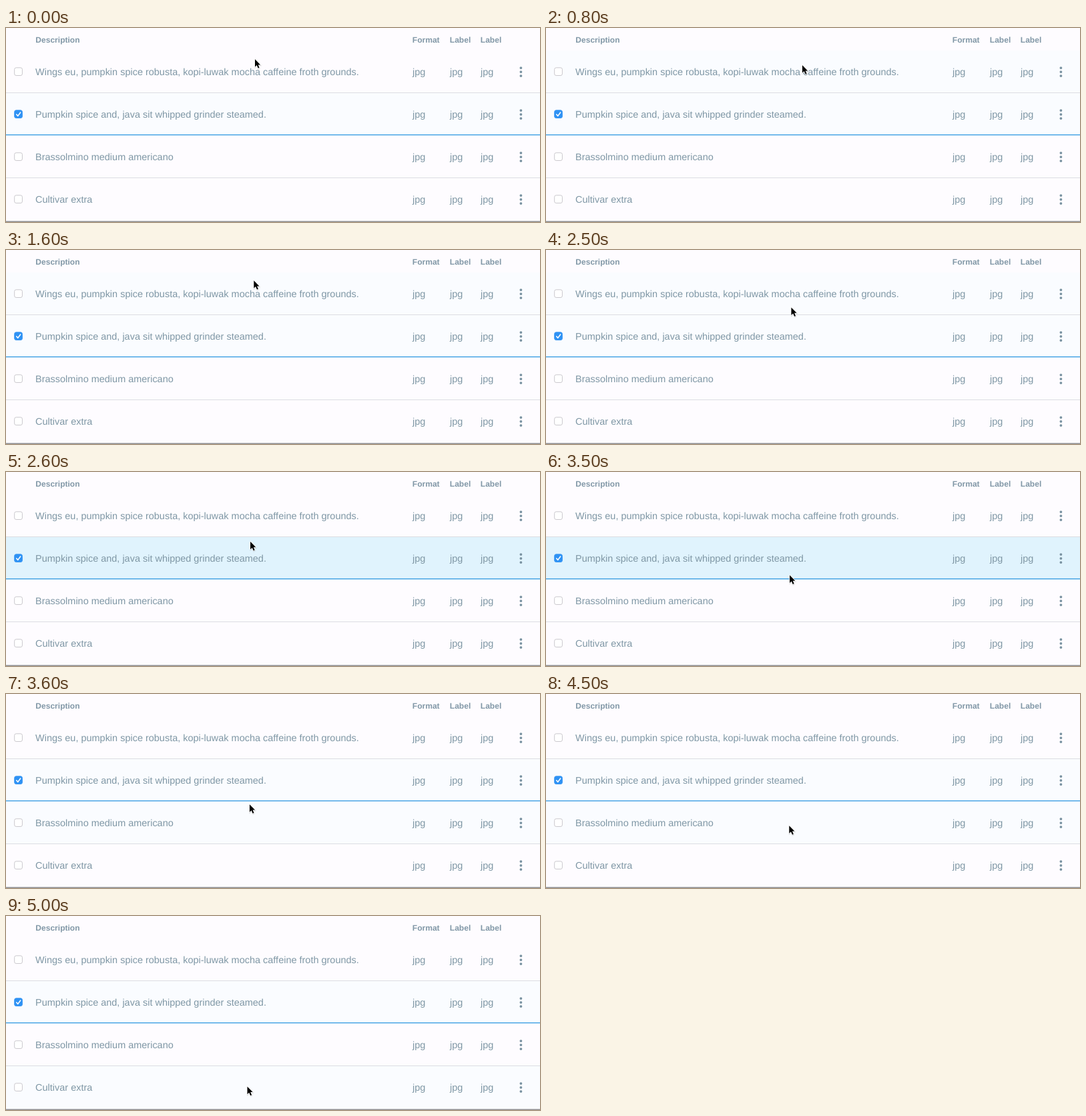
Animation of 800 by 292 pixels, one loop 5.1 s. Source, as an HTML page:

```html
<!DOCTYPE html>
<html lang="en">
<head>
<meta charset="utf-8">
<title>Table row hover</title>
<style>
  html, body { margin: 0; width: 100%; height: 100%; overflow: hidden; background: #fefcff; }
  svg { display: block; }
  text {
    font-family: "Liberation Sans", Arial, sans-serif;
    font-size: 14.47px;
    fill: #7f97a5;
    text-rendering: geometricPrecision;
  }
  .head { font-size: 12.05px; font-weight: bold; fill: #8298a7; }
  .dot { fill: #7891a0; }
  .box { fill: #fff; stroke: #cac8cd; }
  .box.on { fill: #2e92f4; stroke: #3b98f4; }
  .tick { fill: none; stroke: #fff; stroke-width: 1.6; stroke-linecap: round; stroke-linejoin: round; }
  .shade { fill: #000; stroke: #000; stroke-width: 1.5; opacity: .12; }
  .arrow { fill: #000; stroke: #fff; stroke-width: 1.5; stroke-linejoin: round; paint-order: stroke; }
</style>
</head>
<body>
<svg id="stage" width="800" height="292" viewBox="0 0 800 292"></svg>
<script>
const LOOP = 5100, STEP = 100;
const ROW_TOP = 34, ROW_H = 64;
const SELECTED = 1;
const PLAIN = "#fefcff", FAINT = "#fafcff", STRONG = "#e0f3fd";
const rows = [
  "Wings eu, pumpkin spice robusta, kopi-luwak mocha caffeine froth grounds.",
  "Pumpkin spice and, java sit whipped grinder steamed.",
  "Brassolmino medium americano",
  "Cultivar extra"
];
const columns = [[44.3, "Description"], [608.8, "Format"], [664.8, "Label"], [710.8, "Label"]];

// Pointer glides: each eases from the last point and rests until the next begins
const home = { x: 373, y: 47 };
const glides = [
  { from: 0, to: 500, x: 372, y: 74 },
  { from: 600, to: 800, x: 384, y: 56 },
  { from: 900, to: 1500, x: 382, y: 27 },
  { from: 1500, to: 1600, x: 371.3, y: 46 },
  { from: 1900, to: 2200, x: 371, y: 38.5 },
  { from: 2200, to: 2700, x: 365.5, y: 112.5 },
  { from: 2800, to: 3000, x: 365.5, y: 128 },
  { from: 3100, to: 4000, x: 364.5, y: 193.5 },
  { from: 4400, to: 5000, x: 361.5, y: 256.7 }
];

const stage = document.getElementById("stage");

function add(tag, attrs, content) {
  const el = document.createElementNS("http://www.w3.org/2000/svg", tag);
  for (const key in attrs) el.setAttribute(key, attrs[key]);
  if (content) el.textContent = content;
  stage.appendChild(el);
  return el;
}

const line = (y, height, fill) => add("rect", { x: 0, y, width: 800, height, fill });

const bands = rows.map((_, i) => line(ROW_TOP + i * ROW_H, ROW_H, PLAIN));

columns.forEach(([x, label]) => add("text", { x, y: 22.3, class: "head" }, label));

rows.forEach((label, i) => {
  const mid = 65.7 + i * ROW_H;
  const base = mid + 5.7;
  const on = i === SELECTED;
  add("rect", { x: 12.7, y: mid - 5.9, width: 11.7, height: 11.7, rx: 2.5, class: on ? "box on" : "box" });
  if (on) add("path", { d: `M15.7 ${mid + .3} l2.1 2.4 l3.8 -5.2`, class: "tick" });
  add("text", { x: 44.1, y: base }, label);
  columns.slice(1).forEach(([x]) => add("text", { x: x + .2, y: base }, "jpg"));
  [-6, 0, 6].forEach(dy => add("circle", { cx: 771.4, cy: mid + .4 + dy, r: 1.9, class: "dot" }));
});

line(97, 1, "#dcdde2");
line(160, 1.6, "#55abe6");
line(225, 1, "#dcdde2");
line(290, 1, "#c9cacd");
line(291, 1, "#8f8f92");

const d = "M0 0 V11.6 L2.7 9.1 L4.7 13.6 L6.6 12.8 L4.7 8.4 H8.2 Z";
const shade = add("path", { d, class: "shade" });
const arrow = add("path", { d, class: "arrow" });

const ease = u => u * u * (3 - 2 * u);

function tipAt(t) {
  let { x, y } = home;
  for (const g of glides) {
    if (t <= g.from) break;
    const k = ease(Math.min(1, (t - g.from) / (g.to - g.from)));
    x += (g.x - x) * k;
    y += (g.y - y) * k;
  }
  return { x, y };
}

function bandColor(i, over) {
  if (i === SELECTED) return over ? STRONG : FAINT;
  return over ? FAINT : PLAIN;
}

function draw(now) {
  const t = Math.floor(now % LOOP / STEP) * STEP;
  const { x, y } = tipAt(t);
  // Hover only registers once the pointer has moved
  const hovered = t > 0 ? Math.floor((y - ROW_TOP) / ROW_H) : -1;
  bands.forEach((band, i) => band.setAttribute("fill", bandColor(i, i === hovered)));
  arrow.setAttribute("transform", `translate(${x} ${y})`);
  shade.setAttribute("transform", `translate(${x + .3} ${y + 1})`);
}

const start = performance.now();
function tick() {
  draw(performance.now() - start);
  requestAnimationFrame(tick);
}
tick();
</script>
</body>
</html>
```
